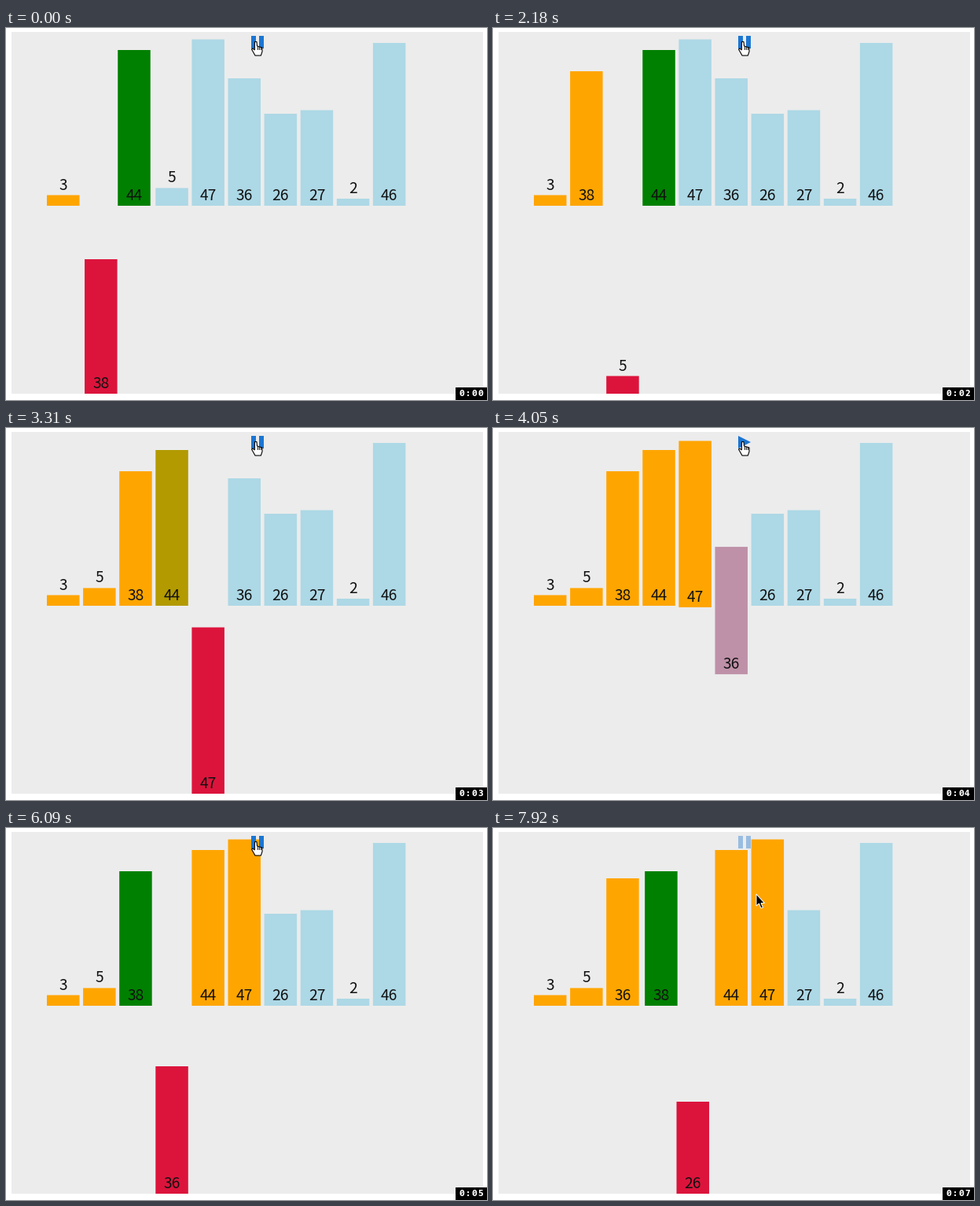
A matplotlib script for the animation above (8000 ms loop, 612x473 px).

```python
import numpy as np
import matplotlib.pyplot as plt
from matplotlib.animation import FuncAnimation
from matplotlib.colors import to_rgb
from matplotlib.patches import Polygon, Rectangle

W, H, DPI = 612, 473, 64
LOOP, INTERVAL = 8000, 40
PT = 72 / DPI  # points per pixel

LEFT, PITCH, BAR_W = 52, 46.1, 41.5
BASE, DROP, UNIT = 226, 239, 4.5
RISE_TIME = 1.66
VALUES = [3, 44, 38, 5, 47, 36, 26, 27, 2, 46]
BLUE = "#1b76d2"

# Playback runs: start ms, end ms, first and last sorting step; paused between
RUNS = [(0, 990, .78, 5.32), (2030, 3750, 5.34, 13.45), (5100, 7920, 13.9, 28.25)]
REFRESH = 142  # ms between visible updates


def ease(t):
    t = min(max(t, 0), 1)
    return 4 * t ** 3 if t < .5 else 1 - 4 * (1 - t) ** 3


def playback(now):
    """Sorting progress, time of the last refresh, and whether it is paused."""
    run = [r for r in RUNS if r[0] <= now][-1]
    start, end, first, last = run
    count = round((end - start) / REFRESH)
    share = min(int((now - start) / (end - start) * count + .1), count) / count
    paused = share == 1 and run is not RUNS[-1]
    return first + (last - first) * share, start + (end - start) * share, paused


class Bar:
    def __init__(self, value, slot):
        self.value = value
        self.start = {
            "x": LEFT + PITCH * slot,
            "y": 0,
            "color": np.array(to_rgb("orange" if slot < 2 else "lightblue")),
        }
        self.moves = []

    def move(self, step, duration=1, **targets):
        if "color" in targets:
            targets["color"] = np.array(to_rgb(targets["color"]))
        self.moves.append((step, duration, targets))

    def state(self, progress):
        now = dict(self.start)
        for step, duration, targets in self.moves:
            k = ease((progress - step) / duration)
            for name, target in targets.items():
                now[name] = now[name] + (target - now[name]) * k
        return now

    def add_to(self, ax):
        self.rect = ax.add_patch(Rectangle((0, 0), BAR_W, self.value * UNIT,
                                           lw=0, snap=False))
        self.label = ax.text(0, 0, str(self.value), ha="center", va="baseline",
                             family="Noto Sans CJK JP", size=19.2 * PT, color="#111111")

    def draw(self, progress):
        now = self.state(progress)
        bottom = BASE + now["y"]
        top = bottom - self.value * UNIT
        self.rect.set_xy((now["x"], top))
        self.rect.set_facecolor(np.clip(now["color"], 0, 1))
        anchor = bottom if self.value > 5 else top
        self.label.set_position((now["x"] + BAR_W / 2, anchor - 7))


def schedule_sort(bars):
    """Insertion sort, turned into timed moves for every bar."""
    order, step = list(bars), -2
    for i in range(2, 7):
        key, j = order[i], i
        key.move(step, y=DROP, color="crimson")
        step += 1
        while True:
            other = order[j - 1]
            other.move(step, color="green")
            if j < i:
                order[j + 1].move(step, color="orange")
            step += 1
            if other.value < key.value:
                break
            key.move(step, x=LEFT + PITCH * (j - 1))
            other.move(step, x=LEFT + PITCH * j)
            order[j - 1], order[j] = key, other
            step += 1
            j -= 1
        key.move(step, RISE_TIME, y=0, color="orange")
        other.move(step, color="orange")
        step += 1


fig = plt.figure(figsize=(W / DPI, H / DPI), dpi=DPI, facecolor="white")
ax = fig.add_axes([0, 0, 1, 1])
ax.set_xlim(0, W)
ax.set_ylim(H, 0)
ax.axis("off")
ax.add_patch(Rectangle((7, 5), 600, 460, fc="#ececec", lw=0))

bars = [Bar(v, i) for i, v in enumerate(VALUES)]
schedule_sort(bars)
for bar in bars:
    bar.add_to(ax)

pause_icon = [ax.add_patch(Rectangle((x, 10), 6, 16, fc=BLUE, lw=0, zorder=4))
              for x in (312, 322)]
play_icon = ax.add_patch(Polygon([(312, 10), (328, 18), (312, 26)],
                                 fc=BLUE, lw=0, zorder=4))

HAND = np.array([(4.5, .5), (7, .5), (7.5, 6), (14, 8), (14, 13), (12.3, 18),
                 (5, 18), (.5, 10), (2, 9), (4.3, 11)])
ARROW = np.array([(0, 0), (0, 15), (3.5, 12), (6, 18), (8.5, 17),
                  (6, 11.5), (10.5, 11.5)])
hand = ax.add_patch(Polygon(HAND, fc="white", ec="black", lw=1.1 * PT, zorder=6))
arrow = ax.add_patch(Polygon(ARROW + (335, 84), fc="black", ec="white",
                             lw=PT, zorder=6))
fingers = [ax.plot([], [], color="black", lw=.9 * PT, zorder=7)[0] for _ in range(3)]

# Clock in the corner, one character per 8 px cell
ax.add_patch(Rectangle((572, 457), 40, 16, fc="black", lw=0, zorder=8))
cells = [579.5 + 8 * i for i in range(4)]
clock = [ax.text(x, 468, char, ha="center", va="baseline", color="white", zorder=9,
                 family="DejaVu Sans", weight="bold", size=9.6 * PT)
         for x, char in zip(cells, "0:00")]
slashes = [ax.plot([x - 1.3, x + 1.3], [466, 463], color="white", lw=PT, zorder=9)[0]
           for x in (cells[0], cells[2], cells[3])]


def draw_cursor(t):
    on_icon = t < 7700
    slide = np.interp(t, [6800, 7070], [0, 1])
    x, y = 312 + 5 * slide, 17 + slide
    hand.set_xy(HAND + (x, y))
    for i, line in enumerate(fingers):
        line.set_data([x + 7.5 + 2.2 * i] * 2, [y + 6.5, y + 10])
    for part in [hand, *fingers]:
        part.set_visible(on_icon)
    arrow.set_visible(not on_icon)


def update(frame):
    now = frame * INTERVAL + INTERVAL - 10
    progress, t, paused = playback(now)
    for bar in bars:
        bar.draw(progress)

    play_icon.set_visible(paused)
    for part in pause_icon:
        part.set_visible(not paused)
        part.set_alpha(np.interp(t, [7620, 7920], [1, .4]))
    draw_cursor(t)

    second = int(now / 1030 + .05)
    clock[3].set_text(str(second))
    slashes[2].set_visible(second == 0)
    return []


animation = FuncAnimation(fig, update, frames=LOOP // INTERVAL, interval=INTERVAL,
                          repeat=True, repeat_delay=0, blit=False)
plt.show()
```
